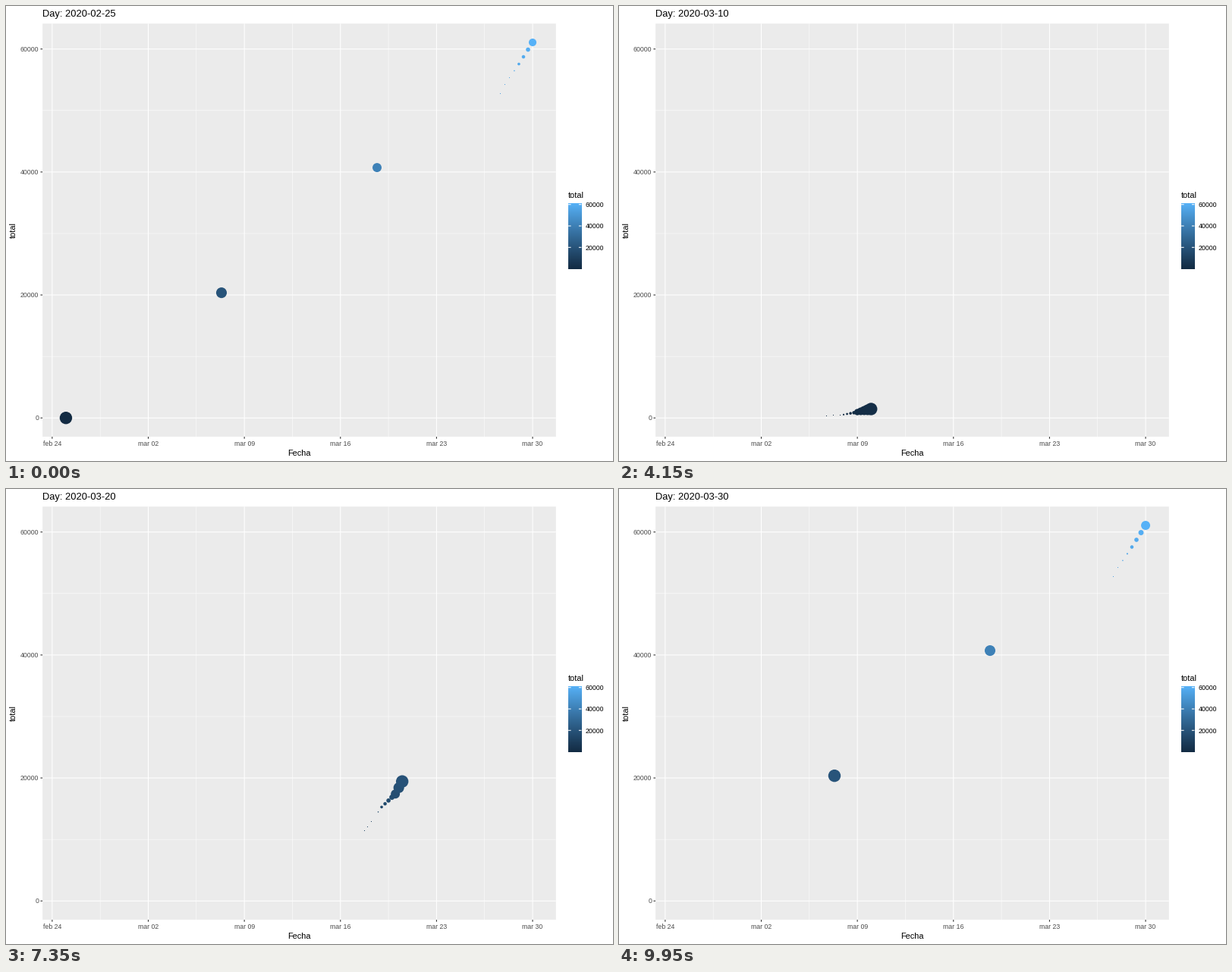
Animation of 800x600 px, one loop 10000 ms. Source, as a matplotlib script:

```python
import math

import numpy as np
import matplotlib.pyplot as plt
from matplotlib.animation import FuncAnimation
from matplotlib.collections import PatchCollection
from matplotlib.patches import Circle, Rectangle

W, H, DPI = 800, 600, 100
PT = 72 / DPI  # points per pixel
FRAMES, INTERVAL = 200, 50
WAKE, RADIUS = 20, 8.2

# Daily totals, starting on 25 February 2020
TOTALS = [3, 10, 16, 34, 57, 83, 125, 169, 228, 282, 350, 405,
          549, 951, 1452, 1898, 2677, 3900, 5100, 6948, 8352, 9659,
          12077, 15273, 17390, 21475, 24277, 27552, 33183, 38809,
          45084, 49844, 54273, 57560, 61075]
DAYS = len(TOTALS)
LOW, HIGH = TOTALS[0], TOTALS[-1]

# Panel edges and the padded data range inside them
LEFT, RIGHT, TOP, BOTTOM = 48.2, 724.8, 23.25, 567.95
DAY_W = (RIGHT - LEFT) / ((DAYS - 1) * 1.1)
X0 = LEFT + 0.05 * (DAYS - 1) * DAY_W
UNIT_H = (BOTTOM - TOP) / ((HIGH - LOW) * 1.1)
Y0 = BOTTOM - 0.05 * (HIGH - LOW) * UNIT_H


def x_at(day):
    return X0 + day * DAY_W


def y_at(total):
    return Y0 - (total - LOW) * UNIT_H


# Colour gradient, mixed in CIE Lab
TO_XYZ = np.array([[0.4124564, 0.3575761, 0.1804375],
                   [0.2126729, 0.7151522, 0.0721750],
                   [0.0193339, 0.1191920, 0.9503041]])
WHITE = TO_XYZ.sum(axis=1)


def to_lab(rgb):
    c = np.array(rgb) / 255
    lin = np.where(c <= 0.04045, c / 12.92, ((c + 0.055) / 1.055) ** 2.4)
    t = TO_XYZ @ lin / WHITE
    f = np.where(t > 0.008856, np.cbrt(t), 7.787 * t + 16 / 116)
    return np.array([116 * f[1] - 16, 500 * (f[0] - f[1]), 200 * (f[1] - f[2])])


def to_rgb(lab):
    fy = (lab[0] + 16) / 116
    f = np.array([fy + lab[1] / 500, fy, fy - lab[2] / 200])
    xyz = WHITE * np.where(f > 0.2069, f ** 3, (f - 16 / 116) / 7.787)
    lin = np.clip(np.linalg.inv(TO_XYZ) @ xyz, 0, 1)
    return np.where(lin <= 0.0031308, 12.92 * lin,
                    1.055 * lin ** (1 / 2.4) - 0.055)


DARK, LIGHT = to_lab((0x13, 0x2B, 0x43)), to_lab((0x56, 0xB1, 0xF7))


def shade(total):
    f = (total - LOW) / (HIGH - LOW)
    return to_rgb(DARK + (LIGHT - DARK) * f)


def build_track():
    """For every frame: day on show, x, y and colour of the point."""
    track = []
    for day, total in enumerate(TOTALS):
        nxt = (day + 1) % DAYS
        hold = 2 if day == 0 else 3
        steps = 3 if day < 26 else 2
        moves = [0] * hold + [i / (steps + 1) for i in range(1, steps + 1)]
        for f in moves:
            value = total + (TOTALS[nxt] - total) * f
            where = day + (nxt - day) * f
            track.append((day, x_at(where), y_at(value), shade(value)))
    return track


TRACK = build_track()

plt.rcParams["font.family"] = "Liberation Sans"
fig = plt.figure(figsize=(W / DPI, H / DPI), dpi=DPI, facecolor="white")
ax = fig.add_axes([0, 0, 1, 1])


def line(xs, ys, width, color="white", z=2):
    ax.plot(xs, ys, color=color, lw=width * PT, snap=False,
            solid_capstyle="butt", zorder=z)


def label(x, y, text, size, color="black", ha="left", rotation=0):
    return ax.text(x, y, text, size=size * PT, color=color, ha=ha,
                   va="baseline", rotation=rotation)


def draw_panel():
    ax.add_patch(Rectangle((LEFT, TOP), RIGHT - LEFT, BOTTOM - TOP,
                           fc="#EBEBEB", lw=0, snap=False, zorder=0))
    for i in range(5):
        x = x_at(-1 + 7 * i + 3.5)
        line([x, x], [TOP, BOTTOM], 0.53)
    for total in (10000, 30000, 50000):
        line([LEFT, RIGHT], [y_at(total)] * 2, 0.53)

    names = ["feb 24", "mar 02", "mar 09", "mar 16", "mar 23", "mar 30"]
    for i, name in enumerate(names):
        x = x_at(-1 + 7 * i)
        line([x, x], [TOP, BOTTOM], 1.07, z=3)
        line([x, x], [BOTTOM, BOTTOM + 2.75], 1.07, "#333333")
        label(x, 580, name, 8.8, "#4D4D4D", "center")
    for total in range(0, 60001, 20000):
        y = y_at(total)
        line([LEFT, RIGHT], [y, y], 1.07, z=3)
        line([LEFT - 2.75, LEFT], [y, y], 1.07, "#333333")
        label(43.2, y + 3.2, str(total), 8.8, "#4D4D4D", "right")

    label((LEFT + RIGHT) / 2, 593, "Fecha", 11, ha="center")
    ax.text(13, (TOP + BOTTOM) / 2, "total", size=11 * PT, rotation=90,
            rotation_mode="anchor", ha="center", va="baseline")


def draw_legend():
    x0, x1, top, base = 741.1, 758.4, 260.2, 346.6
    ramp = np.array([[shade(v)] for v in np.linspace(HIGH, LOW, 200)])
    ax.imshow(ramp, extent=(x0, x1, base, top), aspect="auto",
              interpolation="bilinear", zorder=1)
    label(x0, 253, "total", 11)
    for total in (20000, 40000, 60000):
        y = base - (total - LOW) / (HIGH - LOW) * (base - top)
        line([x0, x0 + 3.46], [y, y], 1.07)
        line([x1 - 3.46, x1], [y, y], 1.07)
        label(763.9, y + 3.2, str(total), 8.8)


draw_panel()
draw_legend()
title = label(LEFT, 14.3, "", 12.9)
dots = ax.add_collection(PatchCollection([], lw=0, zorder=5))
ax.set(xlim=(0, W), ylim=(H, 0))
ax.axis("off")


def dot(x, y, r):
    """A disc, or a single pixel (if its centre is covered) when tiny."""
    if r >= 0.6:
        return Circle((x, y), r)
    px, py = math.floor(x), math.floor(y)
    if math.hypot(x - px - 0.5, y - py - 0.5) > 0.5:
        return None
    return Rectangle((px, py), 1, 1)


def day_name(day):
    return f"2020-02-{25 + day}" if day < 5 else f"2020-03-{day - 4:02d}"


def update(frame):
    shapes, colors = [], []
    for age in range(WAKE - 1, -1, -1):
        _, x, y, color = TRACK[(frame - age) % FRAMES]
        shape = dot(x, y, RADIUS * (1 - age / WAKE) ** 3)
        if shape:
            shapes.append(shape)
            colors.append(color)
    dots.set_paths(shapes)
    dots.set_facecolor(colors)
    title.set_text("Day: " + day_name(TRACK[frame][0]))
    return dots, title


anim = FuncAnimation(fig, update, frames=FRAMES, interval=INTERVAL,
                     repeat=True, repeat_delay=0)
plt.show()
```
